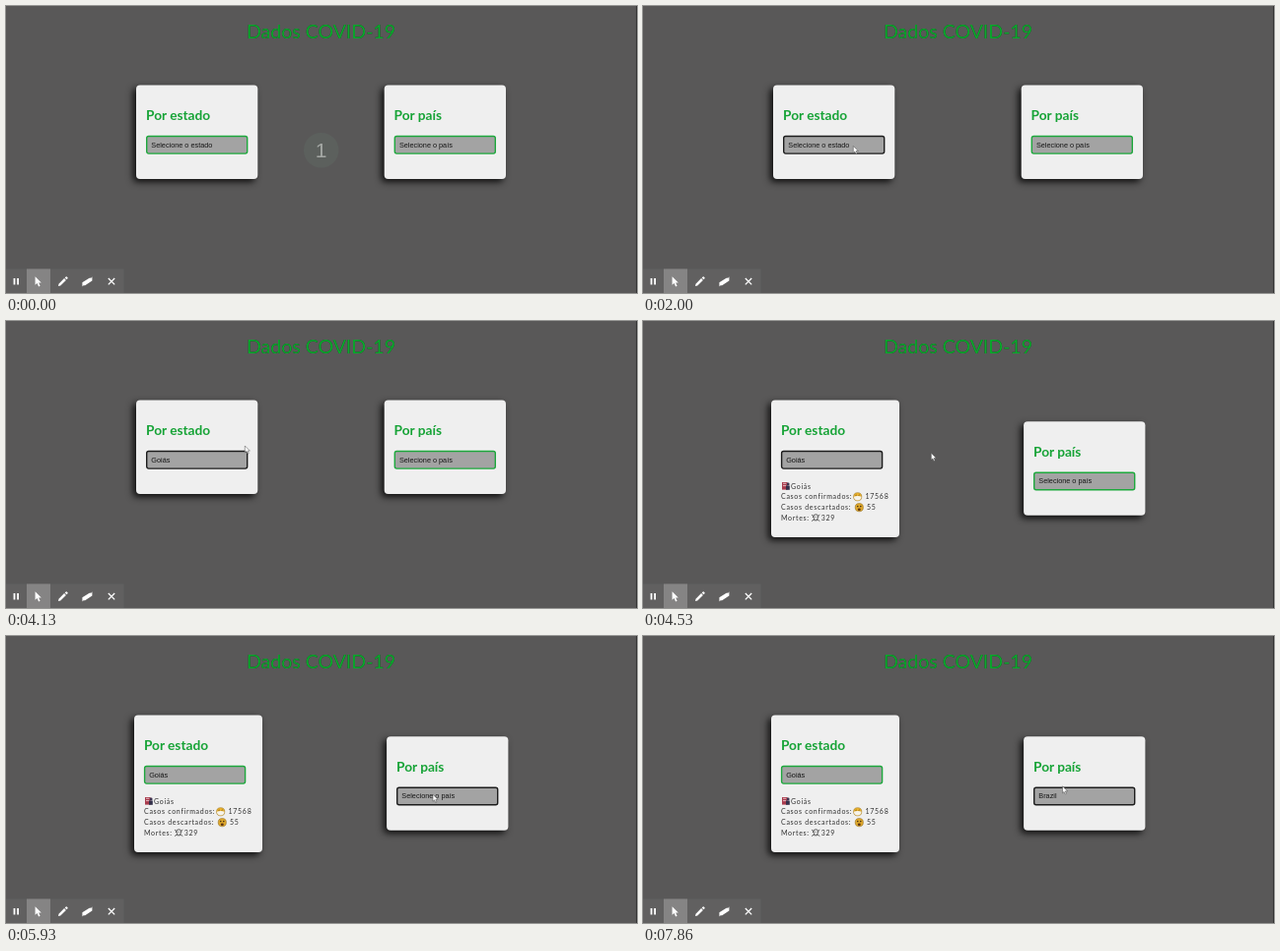
Animation of 640 by 292 pixels, one loop 8 s. Source, as an HTML page:

```html
<!DOCTYPE html>
<html lang="pt">
<head>
<meta charset="utf-8">
<title>Dados COVID-19</title>
<style>
html, body { margin: 0; width: 100%; height: 100%; overflow: hidden; background: #595858; }
svg { display: block; width: 100%; height: 100%; }
.title { font: 19.5px Lato, sans-serif; fill: #0aaa2c; text-anchor: middle; filter: drop-shadow(.8px .8px .6px #222); }
.head { font: 700 13.7px Lato, sans-serif; fill: #16a336; }
.value { font: 7.3px "Liberation Sans", Arial, sans-serif; fill: #161616; }
.stats text { font: 7px Lato, sans-serif; letter-spacing: .7px; fill: #303030; }
.panel { fill: #efefef; filter: drop-shadow(-2.5px 3px 3.5px rgba(0, 0, 0, .85)); }
.field { fill: #a3a3a3; stroke-width: 1.4; }
.count { font: 21px "Liberation Sans", Arial, sans-serif; fill: #a5a8a5; text-anchor: middle; }
</style>
</head>
<body>
<svg viewBox="0 0 640 292">
  <rect width="640" height="292" fill="#595858"/>
  <text class="title" x="319.5" y="33.3">Dados COVID-19</text>

  <g id="state">
    <rect class="panel" id="statePanel" y="80.5" rx="4"/>
    <g id="stateBody">
      <text class="head" x="0" y="116">Por estado</text>
      <rect class="field" id="stateField" x=".7" y="132.5" width="102" height="17.6" rx="2"/>
      <text class="value" id="stateValue" x="5.3" y="143.6"></text>
    </g>
    <g class="stats" id="stats">
      <g>
        <rect x="141" y="164" width="5.6" height="7.6" fill="#a83a4c"/>
        <path d="M142 165.3h3.4M142 167.6h3.4" stroke="#eccdd2" stroke-width=".9"/>
        <path d="M145 167.5h3.8v4.3h-3.8z" fill="#33304a"/>
        <circle cx="147.2" cy="166" r="1.4" fill="#3c3450"/>
      </g>
      <text x="150" y="170.5">Goiás</text>
      <text x="140" y="181.3">Casos confirmados:</text>
      <g>
        <circle cx="217.7" cy="178.8" r="4.1" fill="#efb62f" stroke="#8a6413" stroke-width=".5"/>
        <path d="M213.9 178.8q3.8-1.5 7.6 0q-.3 3.8-3.8 3.8t-3.8-3.8z" fill="#f5f3ec"/>
        <path d="M215.3 177.4q.8-.8 1.6 0M218.5 177.4q.8-.8 1.6 0" fill="none" stroke="#4a3515" stroke-width=".6"/>
      </g>
      <text x="225.6" y="181.3">17568</text>
      <text x="140" y="192.1">Casos descartados:</text>
      <g>
        <circle cx="219.3" cy="189.7" r="4.1" fill="#e0a92c" stroke="#805c13" stroke-width=".5"/>
        <circle cx="217.8" cy="188.6" r=".8" fill="#3d2c12"/>
        <circle cx="220.8" cy="188.6" r=".8" fill="#3d2c12"/>
        <ellipse cx="219.3" cy="191.7" rx="1.5" ry="1.2" fill="#5c3414"/>
      </g>
      <text x="227" y="192.1">55</text>
      <text x="140" y="202.9">Mortes:</text>
      <g fill="none" stroke="#3a3a3a" stroke-width=".8" stroke-linecap="round">
        <path d="M171.4 197.4l7.6 6M179 197.4l-7.6 6"/>
        <path d="M172.6 199.2q0-2.4 2.6-2.4t2.6 2.4q0 1.6-1.2 2v1.6h-2.8v-1.6q-1.2-.4-1.2-2z" fill="#efefef"/>
        <path d="M174.2 199.4h.1M176.2 199.4h.1"/>
      </g>
      <text x="180.7" y="202.9">329</text>
    </g>
  </g>

  <g id="country">
    <rect class="panel" x="383.7" y="80.5" width="123.3" height="95.6" rx="4"/>
    <text class="head" x="393.6" y="116">Por país</text>
    <rect class="field" id="countryField" x="394.3" y="132.5" width="102" height="17.6" rx="2"/>
    <text class="value" id="countryValue" x="398.9" y="143.6"></text>
  </g>

  <g id="countdown">
    <circle cx="319.7" cy="146.7" r="17.8" fill="#5c605d"/>
    <text class="count" x="319.7" y="153.7">1</text>
  </g>

  <rect y="267.5" width="119.5" height="24.5" fill="#616060"/>
  <rect x="21" y="267.5" width="24" height="24.5" fill="#858484"/>
  <g fill="#fff">
    <path d="M7.6 277h1.8v6.6H7.6zM11.2 277H13v6.6h-1.8z"/>
    <path d="M29.6 275.2v8.6l2-1.7 1.5 3.3 1.5-.7-1.5-3.2h2.7z"/>
    <path d="M53 285l.5-2.3 5.6-5.6 1.8 1.8-5.6 5.6zM59.7 276.5l1-1q.5-.4 1 0l.8.8q.4.5 0 1l-1 1z"/>
    <path d="M77.4 281.3l7.2-4.6q2.6.2 2.8-1.5v4.3l-7.2 4.8q-2.2-.4-2.8 1.2z"/>
    <path d="M103.8 277l6.4 6.4M110.2 277l-6.4 6.4" stroke="#fff" stroke-width="1.3"/>
  </g>
  <rect x="639" width="1" height="292" fill="#333"/>

  <path id="cursor" d="M0 0v7l1.6-1.4 1.1 2.5 1.2-.5-1.1-2.5h2.3z" fill="#fff" stroke="#444" stroke-width=".5"/>
</svg>
<script>
const LOOP = 8000;
const FOCUS_STATE = 1000, PICK_STATE = 4060, LOADED = 4330, FOCUS_COUNTRY = 5460, PICK_COUNTRY = 6200;
const GREEN = '#1da83c', DARK = '#1c1c1c';

// Pointer stops: [ms, x, y]
const path = [
  [60, 86, 273], [730, 213.3, 142.5], [1200, 213.3, 142.5], [1370, 214, 152], [1530, 213.3, 142.5],
  [4000, 213.3, 142.5], [4130, 242.3, 127], [4260, 250, 126], [5130, 433.5, 162],
  [5730, 433.5, 162], [6500, 430.5, 157.5], [7100, 429, 156], [7800, 425.5, 152.8], [LOOP, 425.5, 152.8]
];

const $ = id => document.getElementById(id);
const set = (id, attrs) => { for (const k in attrs) $(id).setAttribute(k, attrs[k]); };
const show = (id, on) => set(id, { visibility: on ? 'visible' : 'hidden' });
const ease = p => p * p * (3 - 2 * p);

function pointer(t) {
  const i = Math.max(1, path.findIndex(s => s[0] > t));
  const [t0, x0, y0] = path[i - 1], [t1, x1, y1] = path[i];
  const p = ease(Math.max(0, (t - t0) / (t1 - t0)));
  return [x0 + (x1 - x0) * p, y0 + (y1 - y0) * p];
}

function draw(t) {
  const loaded = t >= LOADED;
  show('countdown', t < 60);
  show('cursor', t >= 60);
  show('stats', loaded);
  set('cursor', { transform: `translate(${pointer(t)})` });
  set('statePanel', { x: loaded ? 130 : 132, width: loaded ? 130 : 123.3, height: loaded ? 139.6 : 95.6 });
  set('stateBody', { transform: `translate(${loaded ? 139.9 : 142})` });
  set('country', { transform: loaded ? 'translate(2.4 21.7)' : '' });
  set('stateField', { stroke: t >= FOCUS_STATE && t < FOCUS_COUNTRY ? DARK : GREEN });
  set('countryField', { stroke: t >= FOCUS_COUNTRY ? DARK : GREEN });
  $('stateValue').textContent = t < PICK_STATE ? 'Selecione o estado' : 'Goiás';
  $('countryValue').textContent = t < PICK_COUNTRY ? 'Selecione o país' : 'Brazil';
}

const start = performance.now();
function tick() {
  draw((performance.now() - start) % LOOP);
  requestAnimationFrame(tick);
}
draw(0);
requestAnimationFrame(tick);
</script>
</body>
</html>
```
